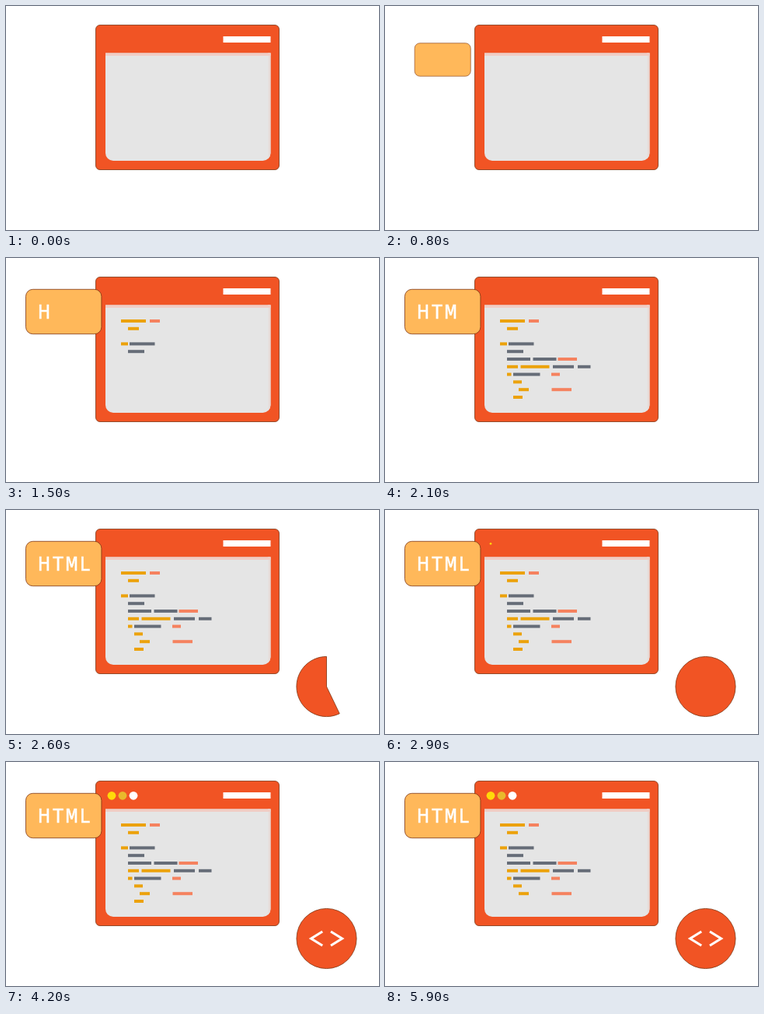
Recreate the animation shown at these times as an HTML page. Size 480 px wide and 288 px high, loop 6000 ms.

```html
<!DOCTYPE html>
<html lang="en">
<head>
<meta charset="utf-8">
<title>Code window</title>
<style>
  html, body { margin: 0; width: 100%; height: 100%; overflow: hidden; background: #fff; }
  svg { display: block; width: 100vw; height: 100vh; }
  .edge { stroke: #7d3514; stroke-width: .8; }
  .orange { fill: #f15424; }
  .chevron { fill: none; stroke: #fff; stroke-width: 3.2; }
  text { font: 26px "Noto Sans Mono", "DejaVu Sans Mono", monospace; fill: #fff; stroke: #fff; stroke-width: .4; text-anchor: middle; }
</style>
</head>
<body>
<svg viewBox="0 0 480 288">
  <defs>
    <linearGradient id="rim">
      <stop offset="0" stop-color="#e5e5e5"/>
      <stop offset="1" stop-color="#e9cfc8"/>
    </linearGradient>
    <clipPath id="panel"><path d="M128 60.5H340.5V189a10 10 0 0 1-10 10H138a10 10 0 0 1-10-10Z"/></clipPath>
  </defs>
  <rect class="orange edge" x="115.5" y="24.5" width="236" height="186" rx="5.5"/>
  <rect x="279.5" y="39" width="61" height="8" fill="#fff"/>
  <g clip-path="url(#panel)">
    <rect x="128" y="60" width="213" height="140" fill="#e5e5e5"/>
    <rect x="337" y="60" width="4" height="140" fill="url(#rim)"/>
    <rect x="128" y="60" width="213" height="4" fill="#f0cdc5"/>
  </g>
  <g id="code"></g>
  <g id="dots">
    <circle cx="136" cy="43.3" fill="#ffd90a"/>
    <circle cx="150" cy="43.3" fill="#e9b92c"/>
    <circle cx="164" cy="43.3" fill="#fff"/>
  </g>
  <g id="tag"><rect class="edge" x="-48.7" y="-28.7" width="97.4" height="57.4" rx="9" fill="#ffb85a"/></g>
  <g id="word">
    <text x="49" y="78">H</text>
    <text x="67" y="78">T</text>
    <text x="84.5" y="78">M</text>
    <text x="102" y="78">L</text>
  </g>
  <path id="pie" class="orange edge"/>
  <g id="left"><path class="chevron" d="M7.5-9L-7 0L7.5 9"/></g>
  <g id="right"><path class="chevron" d="M-7.5-9L7 0L-7.5 9"/></g>
</svg>
<script>
const LOOP = 6000, STEP = 100;
const $ = id => document.getElementById(id);
const colors = { y: '#eca20c', g: '#666d78', r: '#f5825f' };

// each line: row slot, then bars as [colour, x, width]
const lines = [
  [0, ['y', 148, 32], ['r', 185, 13]],
  [1, ['y', 157, 14]],
  [3, ['y', 148, 9], ['g', 159, 32.5]],
  [4, ['g', 157, 21]],
  [5, ['g', 157, 30], ['g', 190.5, 30], ['r', 222.5, 24.5]],
  [6, ['y', 157, 14], ['y', 174.5, 37], ['g', 216, 27], ['g', 248, 16.5]],
  [7, ['y', 157, 5.5], ['g', 165, 34.5], ['r', 214, 11]],
  [8, ['y', 165, 11]],
  [9, ['y', 172, 13], ['r', 214.5, 25.5]],
  [10, ['y', 165, 12]]
];

$('code').innerHTML = lines.map(([row, ...bars]) => '<g>' + bars.map(([c, x, w]) =>
  `<rect x="${x}" y="${79 + 9.8 * row}" width="${w}" height="4" fill="${colors[c]}"/>`
).join('') + '</g>').join('');

const show = (el, on) => el.setAttribute('visibility', on ? 'visible' : 'hidden');

// size per step since start, holding the last value
function track(t, start, sizes) {
  const i = Math.floor((t - start) / STEP);
  return i < 0 ? 0 : sizes[Math.min(i, sizes.length - 1)];
}

function place(id, x, y, scale) {
  show($(id), scale > 0);
  $(id).setAttribute('transform', `translate(${x} ${y}) scale(${scale})`);
}

function drawPie(part) {
  const x = 412.5, y = 227, r = 38.6, a = part * 2 * Math.PI;
  show($('pie'), part > 0);
  $('pie').setAttribute('d', part < 1
    ? `M${x} ${y}V${y - r}A${r} ${r} 0 ${+(part > .5)} 0 ${x - r * Math.sin(a)} ${y - r * Math.cos(a)}Z`
    : `M${x} ${y - r}a${r} ${r} 0 0 0 0 ${2 * r}a${r} ${r} 0 0 0 0 ${-2 * r}Z`);
}

function draw(now) {
  const t = Math.floor(now % LOOP / STEP) * STEP;
  const pop = [.1, .4, .7, 1, 1.22, 1.1, 1];

  place('tag', 74.2, 69, track(t, 600, [.25, .5, .74, 1, 1.04, 1]));
  [...$('code').children].forEach((g, i) =>
    show(g, t >= 1200 + i * STEP && !(i === lines.length - 1 && t >= 5900)));
  [...$('word').children].forEach((el, i) => show(el, t >= 1400 + i * 300));
  drawPie(Math.max(0, Math.min(1, (t - 2200) / 700)));
  [...$('dots').children].forEach((dot, i) =>
    dot.setAttribute('r', 5.4 * track(t, 2900 + i * 400, [.25, .5, .75, 1])));
  place('left', 399.7, 227, track(t, 3000, pop));
  place('right', 425.5, 227, track(t, 3400, pop));
}

function tick() {
  draw(performance.now());
  requestAnimationFrame(tick);
}
tick();
</script>
</body>
</html>
```
